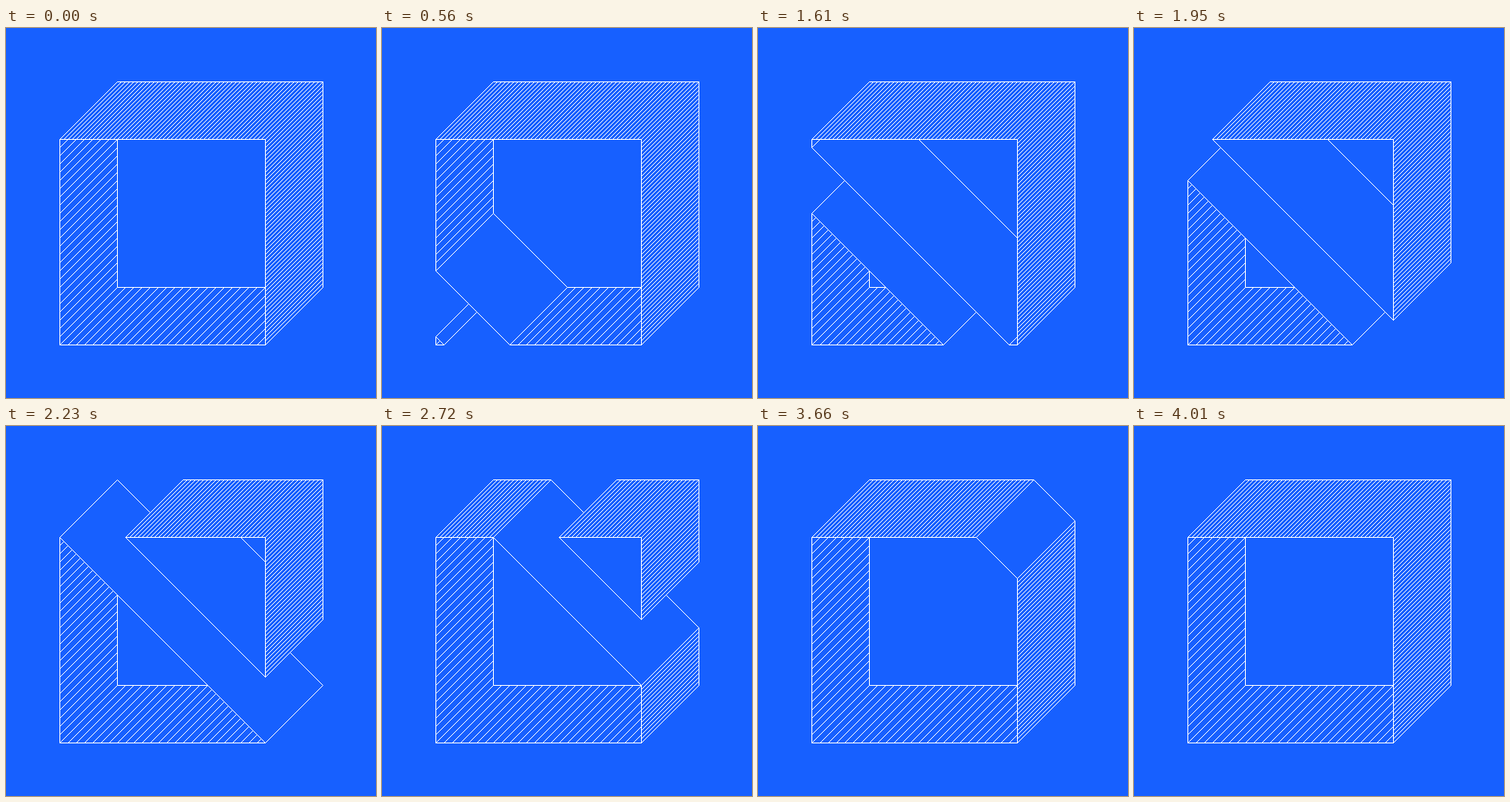
An HTML page with a canvas for the animation above (4040 ms loop, 450 px wide and 450 px high).

```html
<!DOCTYPE html>
<html lang="en">
<head>
<meta charset="utf-8">
<title>Sliced tube</title>
<style>
  html, body { margin: 0; height: 100%; overflow: hidden; background: #1760ff; }
  canvas { display: block; width: 450px; height: 450px; }
</style>
</head>
<body>
<canvas id="stage" width="450" height="450"></canvas>
<script>
const ctx = document.getElementById('stage').getContext('2d');
const BLUE = '#1760ff', WHITE = '#fff';
const LOOP = 4040, DEPTH = 70, GAP = 80;
const SQUARE = [[65, 135], [315, 135], [315, 385], [65, 385]];

const back = ([x, y]) => [x + DEPTH, y - DEPTH];
const slope = ([x, y]) => y - x;
const sum = ([x, y]) => x + y;
const lerp = (a, b, k) => [a[0] + (b[0] - a[0]) * k, a[1] + (b[1] - a[1]) * k];

function trace(points) {
  ctx.beginPath();
  points.forEach(p => ctx.lineTo(...p));
  ctx.closePath();
}

// Part of the square on one side of the line y - x = cut.
function clipSquare(cut, side) {
  const result = [];
  SQUARE.forEach((a, i) => {
    const b = SQUARE[(i + 1) % 4];
    const da = (slope(a) - cut) * side, db = (slope(b) - cut) * side;
    if (da >= 0) result.push(a);
    if (da * db < 0) result.push(lerp(a, b, da / (da - db)));
  });
  return result;
}

function hatch(a, b, step) {
  const from = Math.min(sum(a), sum(b)), to = Math.max(sum(a), sum(b));
  ctx.beginPath();
  for (let s = Math.ceil(from / step) * step; s <= to; s += step) {
    const p = lerp(a, b, (s - sum(a)) / (sum(b) - sum(a)));
    ctx.moveTo(...p);
    ctx.lineTo(...back(p));
  }
  ctx.stroke();
}

function drawWall({ a, b, plain, outer }) {
  trace([a, b, back(b), back(a)]);
  ctx.fill();
  ctx.stroke();
  if (!plain) hatch(a, b, outer ? 5 : 10);
}

// An open tube: inner walls show through the front, outer walls beside it.
function drawTube(front, cut) {
  if (front.length < 3) return;
  const walls = front.map((a, i) => {
    const b = front[(i + 1) % front.length];
    return {
      a, b,
      plain: slope(a) === cut && slope(b) === cut,
      outer: sum(b) > sum(a)
    };
  });
  ctx.save();
  trace(front);
  ctx.clip();
  walls.filter(w => !w.outer).forEach(drawWall);
  ctx.restore();
  walls.filter(w => w.outer).forEach(drawWall);
  trace(front);
  ctx.stroke();
}

// The motion advances in steps of 70 ms, with one short and one long step.
function stepAt(t) {
  if (t >= 3380) return Math.floor((t - 20) / 70);
  if (t >= 2230) return Math.min(47, Math.floor((t + 10) / 70));
  return Math.floor(t / 70);
}

function draw(now) {
  const step = stepAt(now % LOOP);
  const cut = step ? 310 - 10 * step : 320;
  ctx.setTransform(1, 0, 0, 1, 0, 0);
  ctx.fillStyle = BLUE;
  ctx.strokeStyle = WHITE;
  ctx.lineWidth = 1;
  ctx.fillRect(0, 0, 450, 450);
  ctx.translate(0.5, 0.5);
  drawTube(clipSquare(cut + GAP, 1), cut + GAP);
  drawTube(clipSquare(cut, -1), cut);
  requestAnimationFrame(draw);
}
requestAnimationFrame(draw);
</script>
</body>
</html>
```
